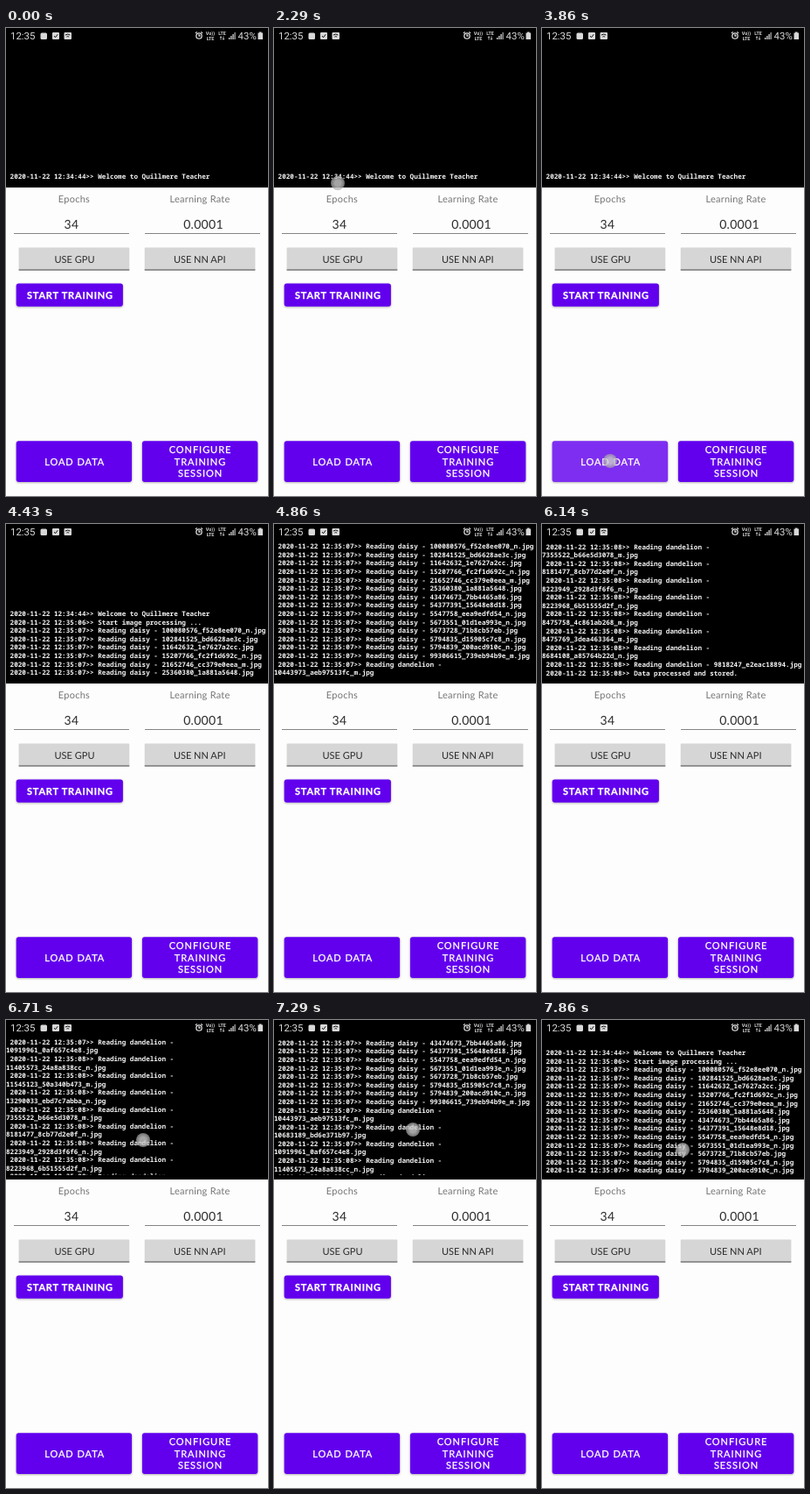
An HTML page that plays this animation: 300x534 px, repeating every 8000 ms.

```html
<!DOCTYPE html>
<html lang="en">
<head>
<meta charset="utf-8">
<title>Training console</title>
<style>
  html, body { margin: 0; width: 100%; height: 100%; overflow: hidden; background: #fdfdfd; }
  #stage { position: absolute; left: 0; top: 0; width: 300px; height: 534px; overflow: hidden; text-rendering: geometricPrecision; }
  svg { position: absolute; left: 0; top: 0; }
  svg text { font: 400 11px Lato, "Open Sans", sans-serif; text-anchor: middle; }
  svg .label { fill: #757575; letter-spacing: .25px; }
  svg .value { font-size: 14px; fill: #2b2b2b; letter-spacing: .3px; }
  svg .key { fill: #2b2b2b; }
  svg .action { fill: #fff; stroke: #fff; stroke-width: .3px; letter-spacing: .95px; }
  svg .strong { font-weight: 700; letter-spacing: .8px; }
  svg .status { font: 400 11.4px Roboto, sans-serif; fill: #d8d8d8; text-anchor: start; }
  svg .tiny { font: 700 5.4px Roboto, sans-serif; fill: #d8d8d8; }
  .purple { fill: #6200ee; }
  #console { position: absolute; left: 0; top: 22px; width: 300px; height: 155px; overflow: hidden; }
  #log { margin: 0; font: 600 7.64px/9.6px "Noto Sans Mono", "DejaVu Sans Mono", monospace; color: #f4f4f4; white-space: pre; }
  #dot { position: absolute; left: -8px; top: -8px; width: 16px; height: 16px; border-radius: 50%;
    background: radial-gradient(circle, rgba(205,205,205,.8) 30%, rgba(165,165,165,.7) 66%, rgba(150,150,150,.4)); }
</style>
</head>
<body>
<div id="stage">
  <svg width="300" height="534" viewBox="0 0 300 534">
    <defs>
      <filter id="shade" x="-10%" y="-20%" width="120%" height="150%">
        <feDropShadow dx="0" dy="0.8" stdDeviation="0.9" flood-opacity=".35"/>
      </filter>
    </defs>
    <rect width="300" height="534" fill="#fdfdfd"/>
    <rect width="300" height="182"/>

    <text class="status" x="5" y="13">12:35</text>
    <g fill="#d8d8d8">
      <rect x="39.5" y="5.5" width="7.5" height="7.5" rx="1.5"/>
      <rect x="53" y="5" width="8" height="8" rx="1"/>
      <rect x="66.5" y="5" width="8.5" height="8" rx="1"/>
      <path d="M255 13v-2h1.3v2zM257.2 13v-4h1.3v4zM259.4 13V7h1.3v6zM261.6 13V5h1v8z"/>
      <path d="M288.5 5.5h1.5v-1h2.5v1h1.5V13h-5.5z"/>
    </g>
    <g fill="none" stroke="#111">
      <path d="M55 9l1.5 1.7 2.7-3.4"/>
      <path d="M68 8q2.7-2 5.4 0M69.5 10q1.2-1 2.4 0"/>
    </g>
    <g fill="none" stroke="#d8d8d8" stroke-width="1.3">
      <circle cx="221" cy="9" r="3.2"/>
      <path d="M221 7v2h1.6M217 6l1.6-1.6M225 6l-1.6-1.6"/>
    </g>
    <text class="tiny" x="234" y="8.2">Vo))</text>
    <text class="tiny" x="234" y="13.5">LTE</text>
    <text class="tiny" x="247.5" y="8.2">LTE</text>
    <path d="M246 13.5V10m-1 1l1-1.4 1 1.4M249 9.5V13m-1-1l1 1.4 1-1.4" stroke="#d8d8d8" stroke-width=".8" fill="none"/>
    <text class="status" x="265.6" y="13">43%</text>

    <text class="label" x="78" y="199">Epochs</text>
    <text class="label" x="222" y="199">Learning Rate</text>
    <text class="value" x="75" y="229">34</text>
    <text class="value" x="226" y="229">0.0001</text>
    <path d="M9 234.5H141M159 234.5H291" stroke="#858585"/>

    <g fill="#d6d6d6">
      <rect x="14.6" y="250.6" width="126.7" height="26.2" rx="1"/>
      <rect x="158.7" y="250.6" width="126.7" height="26.2" rx="1"/>
    </g>
    <path d="M14.6 276H141.3M158.7 276H285.4" stroke="#7c7c7c" stroke-width="1.5"/>
    <text class="key" x="78.5" y="268">USE GPU</text>
    <text class="key" x="221.7" y="268">USE NN API</text>

    <g class="purple" filter="url(#shade)">
      <rect x="11.7" y="291.4" width="122.2" height="26.3" rx="2.9"/>
      <rect x="11.7" y="471.3" width="132.4" height="46.7" rx="2.9"/>
      <rect x="155.9" y="471.3" width="132.4" height="46.7" rx="2.9"/>
    </g>
    <rect id="press" x="11.7" y="471.3" width="132.4" height="46.7" rx="2.9" fill="#fff" opacity="0"/>
    <text class="action strong" x="73.4" y="309">START TRAINING</text>
    <text class="action" x="78.7" y="499">LOAD DATA</text>
    <text class="action" x="222.5" y="485">CONFIGURE</text>
    <text class="action" x="222.5" y="498.5">TRAINING</text>
    <text class="action" x="222.5" y="512">SESSION</text>
  </svg>
  <div id="console"><pre id="log"></pre></div>
  <div id="dot"></div>
</div>
<script>
const LOOP = 8000, STEP = 1000 / 7, ROW = 9.6, COLS = 65, VISIBLE = 16;
const DAISY = `100080576_f52e8ee070_n 102841525_bd6628ae3c 11642632_1e7627a2cc
  15207766_fc2f1d692c_n 21652746_cc379e0eea_m 25360380_1a881a5648 43474673_7bb4465a86
  54377391_15648e8d18 5547758_eea9edfd54_n 5673551_01d1ea993e_n 5673728_71b8cb57eb
  5794835_d15905c7c8_n 5794839_200acd910c_n 99306615_739eb94b9e_m`.split(/\s+/);
const DANDELION = `10443973_aeb97513fc_m 10683189_bd6e371b97 10919961_0af657c4e8
  11405573_24a8a838cc_n 11545123_50a340b473_m 13290033_ebd7c7abba_n 7355522_b66e5d3078_m
  8181477_8cb77d2e0f_n 8223949_2928d3f6f6_n 8223968_6b51555d2f_n 8475758_4c861ab268_m
  8475769_3dea463364_m 8684108_a85764b22d_n 9818247_e2eac18894`.split(/\s+/);

const line = (time, text) => ` 2020-11-22 12:${time}>> ${text}`;

// Long entries wrap before the file name.
function entry(kind, name, i) {
  const time = kind === "dandelion" && i > 2 ? "35:08" : "35:07";
  const head = line(time, `Reading ${kind} -`), file = name + ".jpg";
  const full = `${head} ${file}`;
  return full.length > COLS ? [head, file] : [full];
}

const entries = [
  ...DAISY.map((n, i) => entry("daisy", n, i)),
  ...DANDELION.map((n, i) => entry("dandelion", n, i))
];

// Console drag: step, first visible row, finger height (0 = lifted)
const DRAG = [
  [45, 27, 70], [46, 24, 99], [47, 20, 137], [48, 16.5, 0], [49, 14, 0], [50, 10.4, 101],
  [51, 7.9, 125], [52, 5.5, 148], [53, 2.5, 0], [54, 0.5, 132], [55, -1.2, 148]
];

const START = 29, DONE = 39;

function rowsAt(k) {
  const rows = [line("34:44", "Welcome to Quillmere Teacher")];
  if (k >= START) rows.push(line("35:06", "Start image processing ..."));
  const count = Math.max(0, 3 * (k - START));
  rows.push(...entries.slice(0, count).flat());
  if (k >= DONE) rows.push(line("35:08", "Data processed and stored."));
  return rows;
}

function touchAt(k, drag) {
  if (k >= 16 && k <= 20) return [73, 177 - 2 * (k - 16)];
  if (k === 27 || k === 28) return [78, 494];
  if (drag && drag[2]) return [159 + (k - 51) / 2, drag[2]];
  return null;
}

const [log, dot, press] = ["log", "dot", "press"].map(id => document.getElementById(id));
let last = -1;

function draw(k) {
  const rows = rowsAt(k);
  const drag = DRAG.find(d => d[0] === k);
  const first = drag ? drag[1] : rows.length - VISIBLE;
  log.textContent = rows.join("\n");
  log.style.transform = `translateY(${0.3 - first * ROW}px)`;

  const touch = touchAt(k, drag);
  dot.style.display = touch ? "block" : "none";
  if (touch) dot.style.transform = `translate(${touch[0]}px, ${touch[1]}px)`;
  press.setAttribute("opacity", k >= 27 && k <= 29 ? 0.18 : 0);
}

const origin = performance.now();
function tick() {
  const t = (performance.now() - origin) % LOOP;
  const k = Math.min(55, Math.floor(t / STEP + 0.05));
  if (k !== last) draw(last = k);
  requestAnimationFrame(tick);
}
tick();
</script>
</body>
</html>
```
